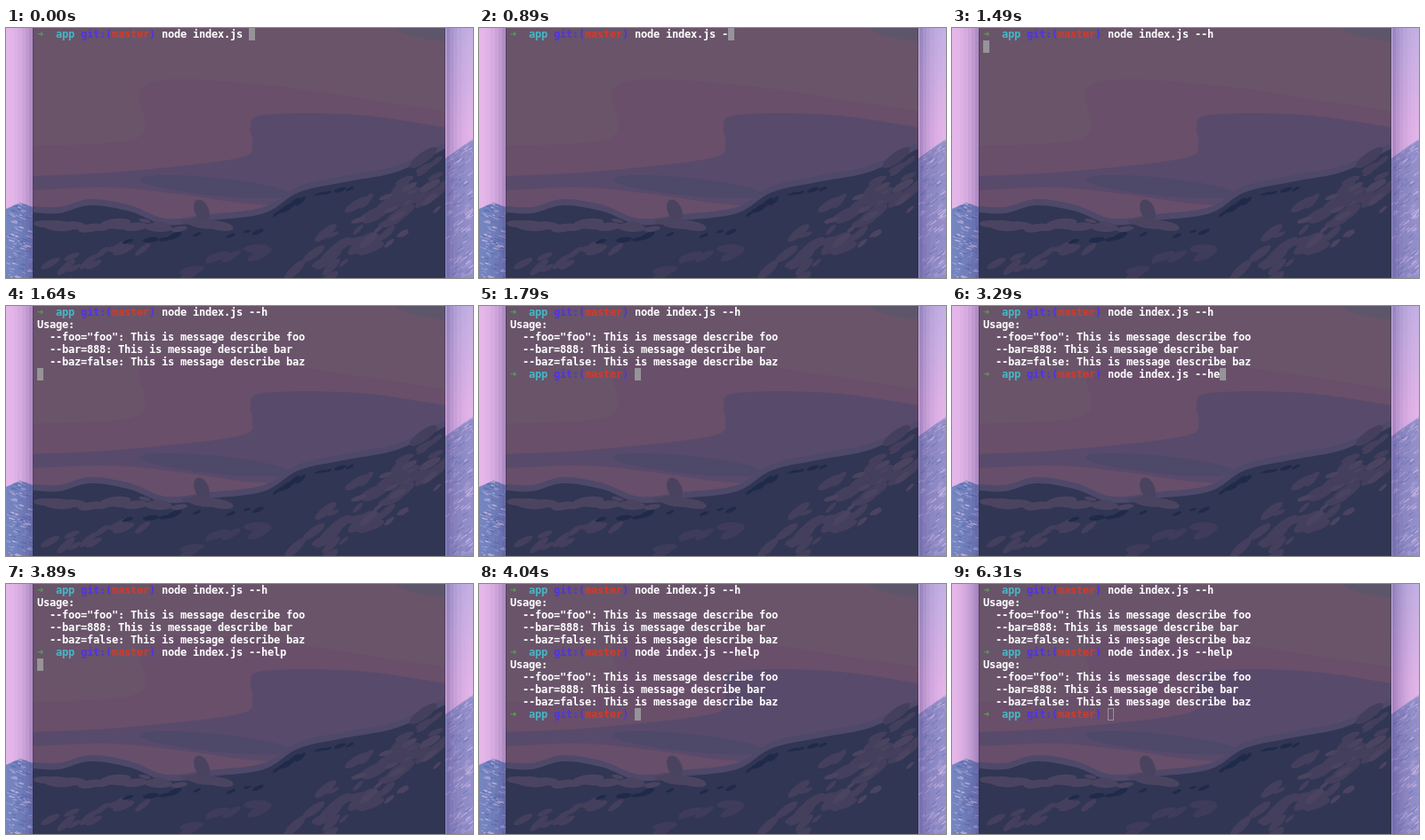
An HTML page with a canvas for the animation above (6.41 s loop, 525x282 px).

```html
<!DOCTYPE html>
<html lang="en">
<head>
<meta charset="utf-8">
<title>Terminal help output</title>
<style>
html, body { margin: 0; width: 100%; height: 100%; overflow: hidden; background: #dfb2e4; }
canvas { position: absolute; left: 0; top: 0; }
pre {
  position: absolute; left: 35px; top: 0; margin: 0; color: #fff;
  font: bold 12px/14px "DejaVu Sans Mono", monospace;
  letter-spacing: calc(7px - 1ch);
  font-variant-ligatures: none;
}
i { font-style: normal; }
.arrow { display: inline-block; width: 7px; height: 14px; vertical-align: top; color: #4da747; }
.dir { color: #45b8c6; }
.git { color: #5033e6; }
.branch { color: #cf3c2c; }
.cursor {
  display: inline-block; box-sizing: border-box; width: 7px; height: 14px;
  vertical-align: top; background: #969399;
}
.hollow { background: none; border: 1px solid #969399; }
</style>
</head>
<body>
<canvas id="smooth" width="525" height="282"></canvas>
<canvas id="banded" width="525" height="282"></canvas>
<pre id="term"></pre>
<script>
const LOOP = 6410, HOLLOW = 6310;
const LEFT = 30, RIGHT = 494, W = 525, H = 282;
const term = document.getElementById('term');
const banded = document.getElementById('banded');

function random(seed) {
  return () => (seed = (seed * 16807) % 2147483647) / 2147483647;
}

// Smooth skyline through the key points, filled down to the bottom
function hill(c, color, pts) {
  const at = i => pts[Math.max(0, Math.min(i, pts.length - 1))];
  c.fillStyle = color;
  c.beginPath();
  c.moveTo(...pts[0]);
  for (let i = 0; i < pts.length - 1; i++) {
    const [p, a, b, n] = [at(i - 1), at(i), at(i + 1), at(i + 2)];
    c.bezierCurveTo(a[0] + (b[0] - p[0]) / 6, a[1] + (b[1] - p[1]) / 6,
      b[0] - (n[0] - a[0]) / 6, b[1] - (n[1] - a[1]) / 6, ...b);
  }
  c.lineTo(RIGHT, H);
  c.lineTo(LEFT, H);
  c.fill();
}

function blob(c, color, x, y, rx, ry, turn) {
  c.fillStyle = color;
  c.beginPath();
  c.ellipse(x, y, rx, ry, turn, 0, 7);
  c.fill();
}

// Patches spread along the line between two points
function scatter(c, rnd, color, count, [x0, y0], [x1, y1], spread, size, turn) {
  for (let i = 0; i < count; i++) {
    const k = (i + rnd()) / count;
    const x = x0 + (x1 - x0) * k + (rnd() - 0.5) * spread;
    const y = y0 + (y1 - y0) * k + (rnd() - 0.5) * spread;
    const r = size * (0.5 + rnd());
    blob(c, color, x, y, r, r * 0.32, turn + (rnd() - 0.5) * 0.5);
  }
}

function slope(c, rnd, ridge, colors, tilt) {
  const x0 = ridge[0][0], x1 = ridge.at(-1)[0];
  c.save();
  c.beginPath();
  ridge.forEach(p => c.lineTo(...p));
  c.lineTo(x1, H);
  c.lineTo(x0, H);
  c.clip();
  c.fillStyle = colors[0];
  c.fillRect(x0, 0, x1 - x0, H);
  for (let i = 0; i < 300; i++) {
    const x = x0 + rnd() * 30, y = 120 + rnd() * 162, len = 2 + rnd() * 5;
    c.strokeStyle = colors[Math.floor(rnd() * colors.length)];
    c.lineWidth = 0.6 + rnd();
    c.beginPath();
    c.moveTo(x, y);
    c.lineTo(x + len, y + len * tilt);
    c.stroke();
  }
  c.restore();
}

function sides(c, steps) {
  const rnd = random(11);
  c.fillStyle = '#e5b7e9';
  c.fillRect(0, 0, W, H);
  const sky = c.createLinearGradient(W, 0, RIGHT, 110);
  sky.addColorStop(0, '#c2b0e3');
  sky.addColorStop(1, '#e2b4e8');
  c.fillStyle = sky;
  c.fillRect(RIGHT, 0, W - RIGHT, H);
  slope(c, rnd, [[0, 204], [16, 197], [30, 202]], ['#7585c0', '#5d72b4', '#98a2d2', '#c9bce2'], 0.3);
  slope(c, rnd, [[494, 147], [525, 125]], ['#938fc9', '#7b82bf', '#aba0d4', '#c0b0de'], -0.8);
  // Window shadow
  for (let x = 0; x < LEFT; x++) {
    const k = Math.floor(x / LEFT * steps) / steps;
    c.fillStyle = `rgba(72, 58, 128, ${0.45 * k ** 1.9})`;
    c.fillRect(x, 0, 1, H);
    c.fillRect(W - 1 - x, 0, 1, H);
  }
}

function landscape(c) {
  const rnd = random(5);
  const ridge = [[30, 208], [60, 209], [95, 200], [140, 207], [180, 222], [230, 217],
    [290, 209], [330, 185], [385, 173], [440, 162], [494, 136]];
  c.save();
  c.beginPath();
  c.rect(LEFT, 0, RIGHT - LEFT, H);
  c.clip();
  c.fillStyle = '#69546a';
  c.fillRect(LEFT, 0, RIGHT - LEFT, H);
  blob(c, '#5d566b', 485, 0, 50, 14, 0.1);
  hill(c, '#694f6a', [[30, 133], [149, 123], [151, 70], [195, 58], [300, 65], [390, 78], [494, 94]]);
  hill(c, '#584a6b', [[30, 167], [130, 162], [260, 147], [277, 130], [275, 112], [290, 98],
    [395, 98], [494, 112]]);
  hill(c, '#674e6a', [[30, 183], [120, 180], [200, 188], [300, 200], [494, 200]]);
  blob(c, '#4e4869', 235, 179, 85, 10, 0.1);
  hill(c, '#4e4869', ridge.map(([x, y]) => [x, y - 7]));
  blob(c, '#49435f', 220, 206, 8, 13, -0.4);
  hill(c, '#303653', ridge);

  scatter(c, rnd, '#443f5c', 45, [488, 160], [345, 275], 50, 13, -0.55);
  scatter(c, rnd, '#4b4460', 16, [485, 180], [405, 235], 40, 9, -0.55);
  scatter(c, rnd, '#4b4460', 16, [35, 220], [240, 224], 10, 13, 0);
  scatter(c, rnd, '#443f5c', 12, [50, 268], [150, 252], 24, 9, -0.5);
  scatter(c, rnd, '#3e3c5a', 7, [190, 270], [300, 255], 20, 11, -0.3);
  scatter(c, rnd, '#202a4a', 8, [120, 245], [300, 227], 8, 7, -0.3);
  scatter(c, rnd, '#202a4a', 7, [303, 209], [335, 192], 3, 6, -0.5);
  scatter(c, rnd, '#202a4a', 5, [340, 190], [395, 179], 2, 5, -0.25);
  c.fillStyle = 'rgba(48, 40, 66, 0.4)';
  c.fillRect(LEFT, 0, 1, H);
  c.fillRect(RIGHT - 1, 0, 1, H);
  c.restore();
}

function scene(id, steps) {
  const c = document.getElementById(id).getContext('2d');
  sides(c, steps);
  landscape(c);
}
scene('smooth', 30);
scene('banded', 7);

const prompt = '<i class="arrow">➜</i>  <i class="dir">app</i> <i class="git">git:(</i>' +
  '<i class="branch">master</i><i class="git">)</i> ';
const option = (flag, name) => `  --${name}=${flag}: This is message describe ${name}\n`;
const usage = 'Usage:\n' + option('"foo"', 'foo') + option('888', 'bar') + option('false', 'baz');
const line = prompt + 'node index.js ';
const short = line + '--h\n';
const second = short + usage + line;
const long = second + '--help\n';

const screens = [
  [0, line],
  [890, line + '-'],
  [1040, line + '--h'],
  [1490, short],
  [1640, short + usage],
  [1790, short + usage + prompt],
  [2390, second + '--h'],
  [3290, second + '--he'],
  [3440, second + '--help'],
  [3890, long],
  [4040, long + usage + prompt]
];

let shown = '';
function draw() {
  const t = performance.now() % LOOP;
  const idle = t >= HOLLOW;
  const text = screens.findLast(s => s[0] <= t)[1];
  const html = `${text}<i class="cursor${idle ? ' hollow' : ''}"></i>`;
  if (html !== shown) {
    term.innerHTML = shown = html;
    banded.style.visibility = idle ? 'hidden' : 'visible';
  }
  requestAnimationFrame(draw);
}
draw();
</script>
</body>
</html>
```
